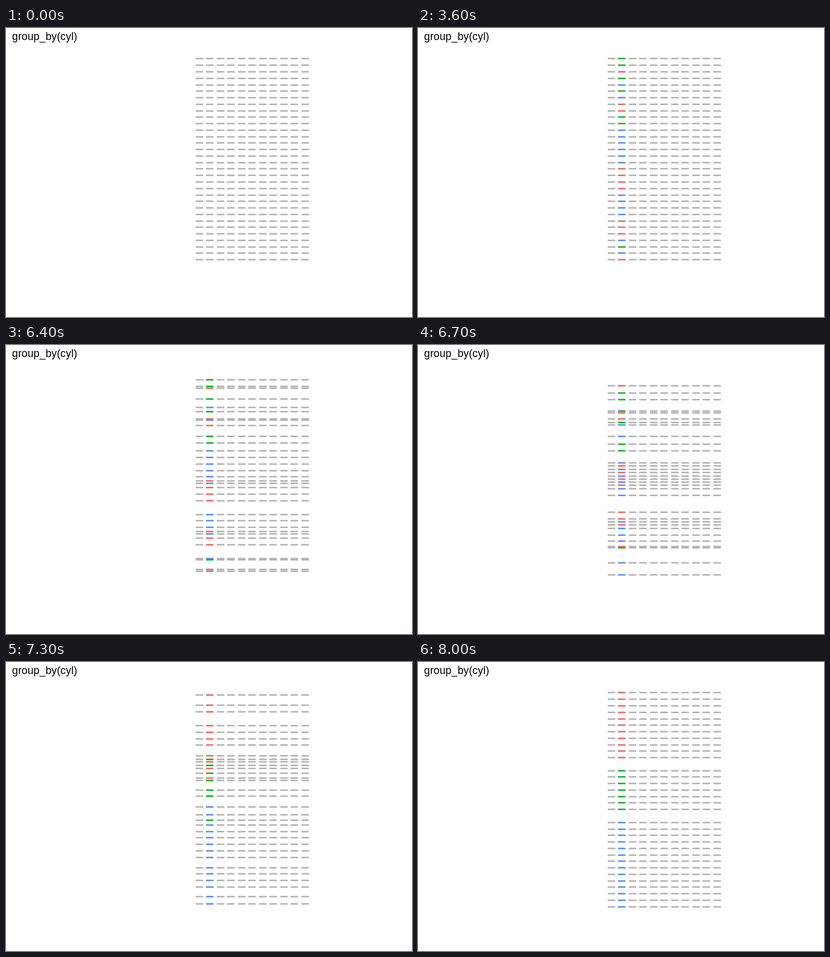
An HTML page with a canvas that plays this animation: 672 px wide and 480 px high, repeating every 10 s.

```html
<!DOCTYPE html>
<html lang="en">
<head>
<meta charset="utf-8">
<title>group_by(cyl)</title>
<style>
  html, body { margin: 0; width: 100%; height: 100%; overflow: hidden; background: #fff; }
  canvas { position: absolute; left: 0; top: 0; }
  h1 {
    position: absolute; left: 10px; top: 4px; margin: 0;
    font: 17.6px/20px "Liberation Sans", Arial, sans-serif;
    letter-spacing: 0.1px; color: #000;
  }
</style>
</head>
<body>
<canvas id="stage" width="672" height="480"></canvas>
<h1>group_by(cyl)</h1>
<script>
const ctx = document.getElementById("stage").getContext("2d");

const LOOP = 10000, STEP = 100, TWEEN_STEPS = 21;
const TINT_AT = 2500, MOVE_AT = 6000;
const COLS = 11, KEY_COL = 1;
const LEFT = 314, TOP = 49.97, PITCH_X = 17.5, PITCH_Y = 10.765;
const TILE_W = 12, TILE_H = 2, EDGE_ALPHA = 0.5;
const GREY = "#b3b3b3";
const HUES = { 4: "#ee6a65", 6: "#14b22a", 8: "#5a8ef7" };

const cyl = [..."66468684466888888444488884448684"];

// Sorted slots, with one empty slot between groups.
const slots = [];
let next = 0;
for (const group of Object.keys(HUES)) {
  cyl.forEach((c, row) => { if (c === group) slots[row] = next++; });
  next++;
}

const quintOut = p => 1 - (1 - p) ** 5;
const cubicInOut = p => p < 0.5 ? 4 * p ** 3 : 1 - 4 * (1 - p) ** 3;

// Progress advances in whole steps; the first step already shows some change.
function progress(time, start) {
  const n = Math.floor((time - start) / STEP) + 1;
  return Math.min(1, Math.max(0, n / TWEEN_STEPS));
}

// A tile sits on whole pixels, with a soft edge above and to the right.
function tile(x, y, color) {
  const x0 = Math.floor(x), y0 = Math.floor(y);
  ctx.fillStyle = color;
  ctx.globalAlpha = 1;
  ctx.fillRect(x0, y0 + 1, TILE_W, TILE_H);
  ctx.globalAlpha = EDGE_ALPHA;
  ctx.fillRect(x0, y0, TILE_W, 1);
  ctx.fillRect(x0 + TILE_W, y0 + 1, 1, TILE_H);
}

function draw(time) {
  const tint = quintOut(progress(time, TINT_AT));
  const move = cubicInOut(progress(time, MOVE_AT));
  ctx.clearRect(0, 0, 672, 480);
  cyl.forEach((c, row) => {
    const y = TOP + PITCH_Y * (row + (slots[row] - row) * move);
    const keyColor = `color-mix(in lab, ${HUES[c]} ${tint * 100}%, ${GREY})`;
    for (let col = 0; col < COLS; col++) {
      tile(LEFT + col * PITCH_X, y, col === KEY_COL ? keyColor : GREY);
    }
  });
}

const start = performance.now();
function tick() {
  draw((performance.now() - start) % LOOP);
  requestAnimationFrame(tick);
}
tick();
</script>
</body>
</html>
```
